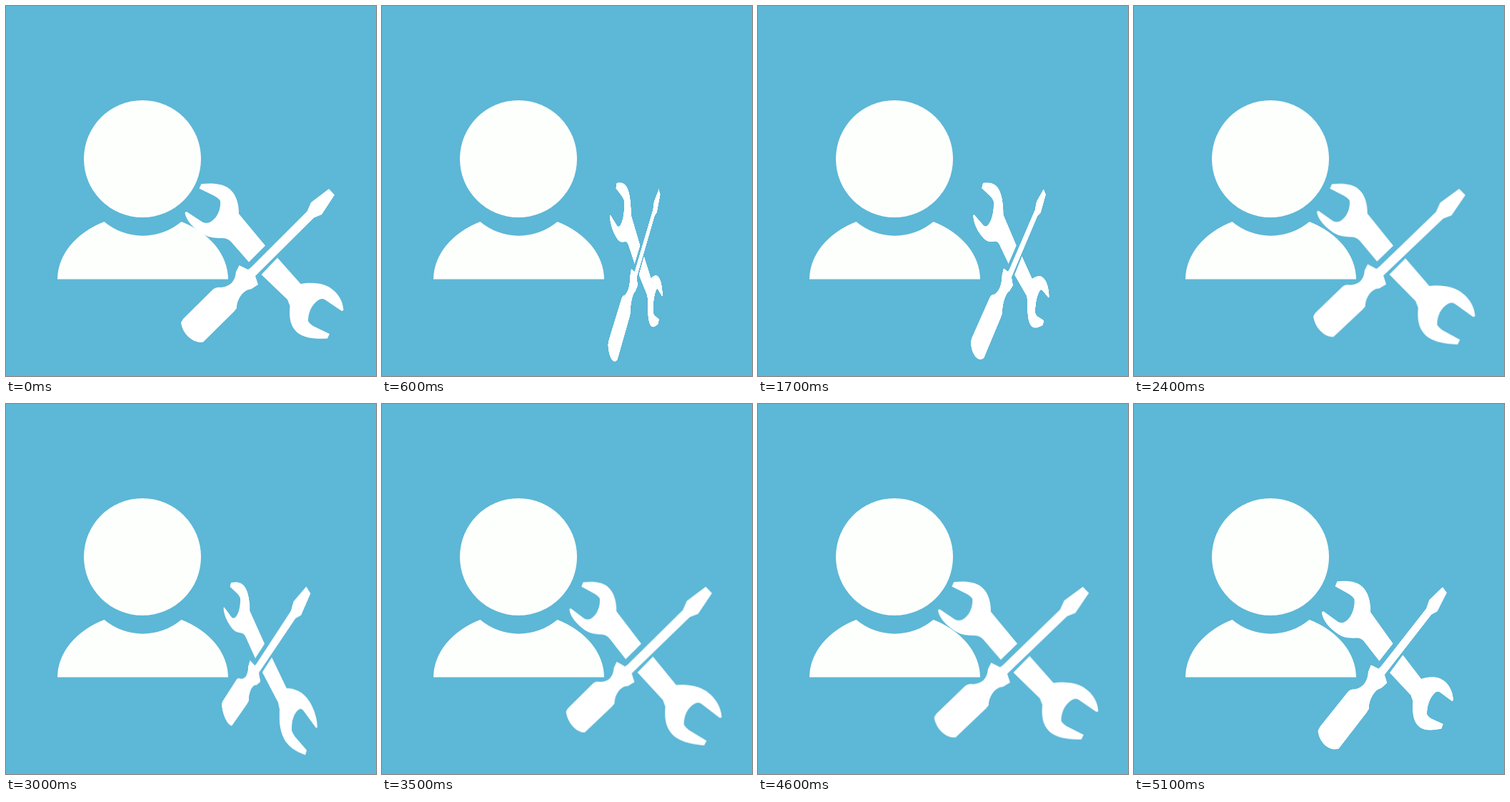
These frames come from a looping animation (518x518 px, 5.2 s). An HTML page:

```html
<!DOCTYPE html>
<html lang="en">
<head>
<meta charset="utf-8">
<title>User tools</title>
<style>
  html, body { margin: 0; width: 100%; height: 100%; overflow: hidden; background: #5db7d6; }
  #stage {
    position: relative; width: 518px; height: 518px; overflow: hidden;
    perspective: 719px; perspective-origin: 259px 259px;
  }
  svg { position: absolute; left: 0; top: 0; fill: #fdfffd; overflow: visible; }
  #tools { transform-origin: 360.6px 259px; fill: #fff; }
</style>
</head>
<body>
<div id="stage">
  <svg width="518" height="518" viewBox="0 0 518 518">
    <circle cx="191" cy="214" r="82"/>
    <path d="M72 382.600A119.500 91 0 0 1 137.500 302A84 84 0 0 0 245.500 302A119.500 91 0 0 1 311 382.600Z"/>
  </svg>
  <svg id="tools" width="518" height="518" viewBox="0 0 518 518">
    <!-- wrench, upper half -->
    <path d="M270.500 255.500L273.500 249C283 248 294 248 302 250.500C318 255 326 270 326 291L363 335.500L340 358.500L315 330Q310 325 303 325C292 325 285 324 279 321C266 314 252 302 250.500 289L253 288L275 302.500Q280 305 286 302.500C296 297 301 284 300 273Q299 270 291 265.500Z"/>
    <!-- wrench, lower half -->
    <path d="M380 352.500L412.500 389C424 387 437 387 447 391C462 397 472 411 472.500 426L470 427L447 411.500Q442 408.500 437 412C428 418 423 429 423 441Q424 444 430 448L453 459L450 465.500C438 466 424 466 414 461C398 453 396 437 397.500 420L394 411L357.500 376Z"/>
    <!-- screwdriver -->
    <path d="M452 256L460 264.500L442 292L431 296.500L351.500 375.500L349 378L353 390L343 396.500C332 397 323 411 323 423L319 428L276 470.500C263 473 247 460 245 443L248 438L290 396.500Q294 393 301 394C313 393 321 386 322 372L326.500 363L339 369L343 366L421.500 287.500L427 275Z"/>
  </svg>
</div>
<script>
const LOOP = 5200, STEP = 100;
const TURN = 27; // degrees per tick of a 24 Hz spin
const tools = document.getElementById('tools');

// The picture changes at 10 Hz and shows the latest tick, after a short rest.
function draw(ms) {
  const n = Math.floor(ms % LOOP / STEP);
  const ticks = Math.max(0, Math.floor((12 * n - 14) / 5));
  tools.style.transform = `rotateY(${-ticks * TURN % 360}deg)`;
}

const start = performance.now();
function tick() {
  draw(performance.now() - start);
  requestAnimationFrame(tick);
}
tick();
</script>
</body>
</html>
```
